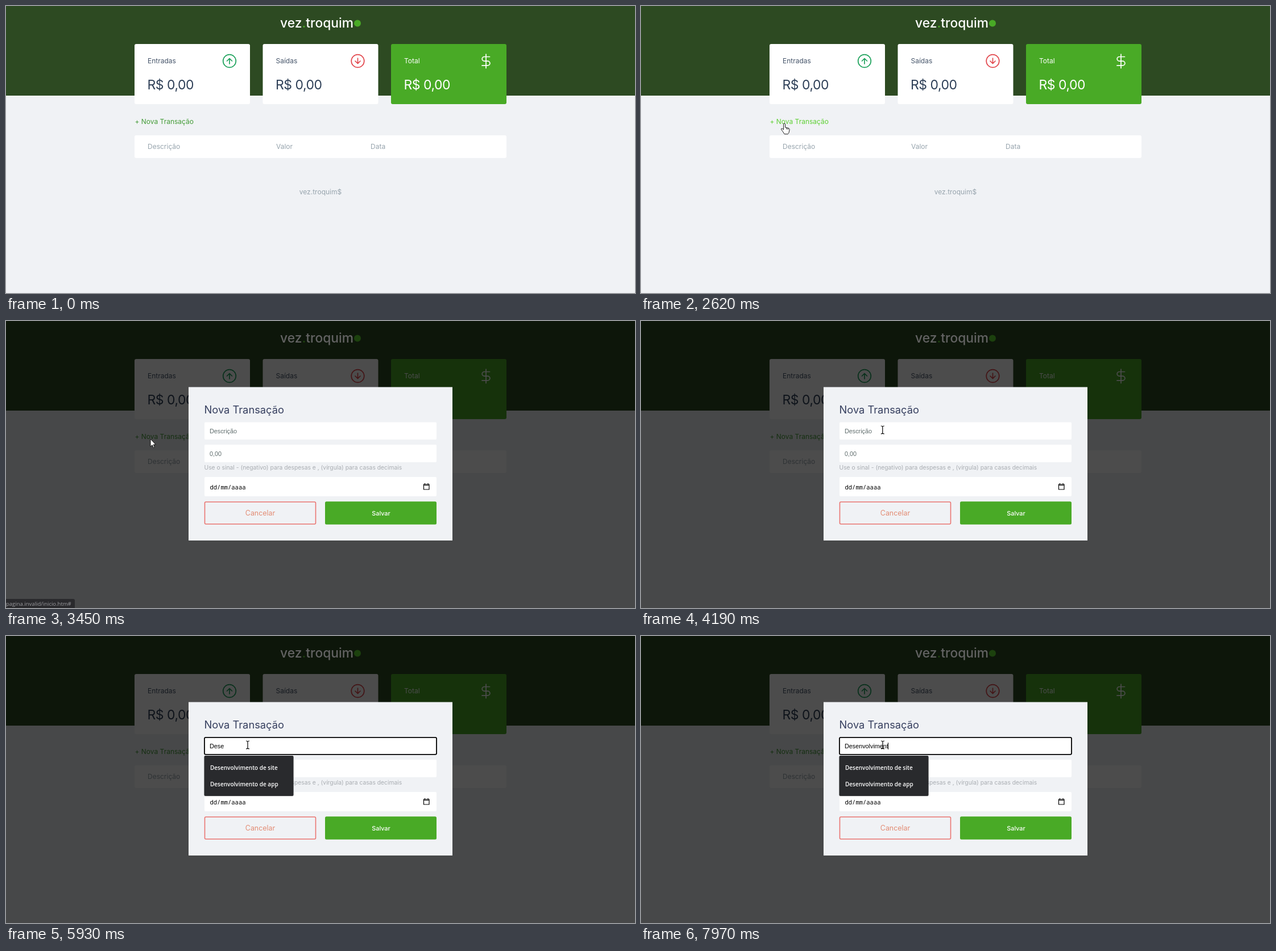
Recreate the animation shown at these times as an HTML page. Size 1106 by 506 pixels, loop 8000 ms.

```html
<!DOCTYPE html>
<html lang="pt-BR">
<head>
<meta charset="utf-8">
<title>Nova Transação</title>
<style>
  html, body { margin: 0; width: 100%; height: 100%; overflow: hidden; background: #f0f2f5; }
  svg { display: block; width: 100vw; height: 100vh; }
  text { font: 400 12px Inter, "Open Sans", sans-serif; white-space: pre; }
  .logo { font-size: 22.8px; font-weight: 500; fill: #fff; }
  .label { fill: #46556a; }
  .value { font-size: 23px; letter-spacing: -.5px; fill: #2f4058; }
  .total text { fill: #fff; }
  .muted { fill: #97a4ad; }
  .mid { text-anchor: middle; }
  .title { font-size: 18.3px; fill: #363f5f; }
  .hint { font-size: 10.3px; fill: #a9adb2; }
  .field { font: 10.8px "Liberation Sans", Arial, sans-serif; fill: #000; }
  .empty { fill: #5f6c6c; }
  .date { font: 10.5px "Noto Sans Mono", monospace; fill: #000; }
  .item { font: 600 10px "Open Sans", sans-serif; fill: #fff; }
  .url { font: 9.5px "Open Sans", sans-serif; fill: #9c9ca0; }
  .cancel { font-size: 12.4px; fill: #e38c74; }
  .save { font-size: 10.8px; font-weight: 500; fill: #fff; }
  .line { fill: none; stroke-linecap: round; stroke-linejoin: round; stroke-width: 1.7; }
</style>
</head>
<body>
<svg viewBox="0 0 1106 506" preserveAspectRatio="none">
  <rect width="1106" height="506" fill="#f0f2f5"/>
  <rect width="1106" height="158" fill="#2d4a22"/>
  <g id="logo">
    <text class="logo" x="482" y="37.5">vez<tspan fill="#49aa26">.</tspan>troquim</text>
    <circle cx="618" cy="30.5" r="6" fill="#49aa26"/>
  </g>
  <g id="cards"></g>

  <text id="link" x="226.5" y="208">+ Nova Transação</text>
  <rect x="226" y="228" width="654" height="40" rx="3" fill="#fff"/>
  <g class="muted">
    <text x="249" y="251.5">Descrição</text>
    <text x="475" y="251.5">Valor</text>
    <text x="641" y="251.5">Data</text>
    <text class="mid" x="553" y="331.5">vez.troquim$</text>
  </g>

  <g id="modal">
    <rect width="1106" height="506" opacity=".7"/>
    <use href="#logo" opacity=".12"/>
    <rect x="321" y="116.5" width="464" height="270.5" fill="#f0f2f5"/>
    <text class="title" x="348.5" y="163">Nova Transação</text>
    <g fill="#fff">
      <rect x="349" y="178.5" width="408" height="30.5" rx="2"/>
      <rect x="349" y="218" width="408" height="31" rx="2"/>
      <rect x="349" y="275" width="408" height="34" rx="2"/>
    </g>
    <text id="holder" class="field empty" x="358" y="197.5">Descrição</text>
    <text class="field empty" x="358" y="237.5">0,00</text>
    <text class="hint" x="348.5" y="261.5">Use o sinal - (negativo) para despesas e , (vírgula) para casas decimais</text>
    <text class="date" x="358.5" y="296.5">dd/mm/aaaa</text>
    <path d="M734.5 288h9.5v9h-9.5zM734.5 289.5h9.5M736.5 286v2M742 286v2" fill="none" stroke="#000" stroke-width="1.2"/>
    <rect x="349.5" y="319" width="195" height="39" rx="2" fill="none" stroke="#ea7470" stroke-width="1.6"/>
    <text class="mid cancel" x="447" y="343">Cancelar</text>
    <rect x="561" y="318.2" width="196" height="40.6" rx="2.5" fill="#49aa26"/>
    <text class="mid save" x="659.5" y="342.8">Salvar</text>

    <g id="focus">
      <rect x="349" y="178.8" width="408" height="30" rx="2" fill="none" stroke="#000" stroke-width="1.8"/>
      <text id="typed" class="field" x="358" y="197.5"></text>
      <rect id="caret" y="188" width="1" height="12"/>
      <rect id="shade" x="348" y="212" width="158" rx="3" opacity=".15"/>
      <rect id="list" x="348.5" y="211" width="157" rx="2" fill="#292a2d"/>
      <g id="items"></g>
    </g>
  </g>

  <g id="status">
    <path d="M0 490H118q3 0 3 3V506H0Z" fill="#2a2a2d"/>
    <text class="url" x="0" y="502">pagina.invalid/inicio.htm#</text>
  </g>

  <circle id="click" r="10" fill="#ff0" opacity=".47"/>
  <g id="pointer" stroke="#000" stroke-width=".9" fill="#fff" stroke-linejoin="round">
    <path id="arrow" d="M0 0V13.5L3.2 10.6L5.2 15.4L7.2 14.5L5.2 9.9H9.3Z"/>
    <path id="hand" d="M-1.5 1.5a1.5 1.5 0 0 1 3 0V7l5.5 1.2q2 .5 2 2.5l-1 5q-.4 2-2 3h-6q-1-1.5-2.5-4l-3-4q-.6-2 1.5-1.8l2.5 2zM3.8 7.8v2.7M6.3 8.3v2.5"/>
    <path id="beam" fill="none" stroke-width="1.2" d="M-3-7Q-.5-7 0-5.800Q.5-7 3-7M0-5.800V5.800M-3 7Q-.5 7 0 5.800Q.5 7 3 7"/>
  </g>
</svg>
<script>
  const LOOP = 8000, STEP = 67, BLINK = 530, ROW = 29.5;
  const HOVER_END = 3380, OPEN = 3450, FOCUS = 4390;
  const $ = id => document.getElementById(id);
  const show = (id, on) => { $(id).style.display = on ? '' : 'none'; };
  const within = (t, from, to) => t >= from && t < to;
  const clamp = v => Math.min(1, Math.max(0, v));
  const ease = p => p * p * (3 - 2 * p);

  const ring = '<circle cx="167" cy="30" r="11.3"/>';
  const cards = [
    ['Entradas', '#1fa35d', ring + '<path d="M167 35V25.500M162.500 30L167 25.500L171.500 30"/>'],
    ['Saídas', '#e2484e', ring + '<path d="M167 25V34.500M162.500 30L167 34.500L171.500 30"/>'],
    ['Total', '#fff', '<path d="M167 18V42.500M173.500 22.500h-9.500a3.800 3.800 0 0 0 0 7.600h6a3.900 3.900 0 0 1 0 7.800h-10"/>']
  ];
  $('cards').innerHTML = cards.map(([name, color, icon], i) => `
    <g class="${name.toLowerCase()}" transform="translate(${226 + 225.5 * i} 67)">
      <rect width="203" height="106" rx="3" fill="${i < 2 ? '#fff' : '#49aa26'}"/>
      <text class="label" x="23" y="34">${name}</text>
      <text class="value" x="22.5" y="79.5">R$ 0,00</text>
      <g class="line" stroke="${color}">${icon}</g>
    </g>`).join('');

  // pointer glides: start, duration, end point
  const home = { x: 1077, y: 486 };
  const glides = [
    { start: 530, time: 140, x: 1097, y: 498 },
    { start: 1200, time: 270, x: 635, y: 371 },
    { start: 1730, time: 130, x: 198, y: 310 },
    { start: 2130, time: 400, x: 252, y: 207 },
    { start: 2620, time: 290, x: 254, y: 208 },
    { start: 3710, time: 480, x: 425, y: 192 }
  ];

  function pointerAt(t) {
    let { x, y } = home;
    for (const g of glides) {
      if (t < g.start) break;
      const gone = Math.floor((t - g.start) / STEP + 1) * STEP;
      const p = ease(clamp(gone / (g.time + STEP)));
      x += (g.x - x) * p;
      y += (g.y - y) * p;
    }
    return { x, y };
  }

  // typing comes in bursts of evenly spaced letters
  const word = 'Desenvolviment';
  const bursts = [
    { start: 4860, gap: 180, count: 4 },
    { start: 6000, gap: 0, count: 1 },
    { start: 6450, gap: 190, count: 9 }
  ];
  const keys = bursts.flatMap(b => Array.from({ length: b.count }, (_, i) => b.start + i * b.gap));
  const entries = ['Desenvolvimento de site', 'descrição', 'Desenvolvimento de app',
    'Aluguel', 'Internet', 'Conta de luz'];

  function setText(text) {
    const hits = entries.filter(e => e.toLowerCase().startsWith(text.toLowerCase()));
    const height = 12 + ROW * hits.length;
    $('typed').textContent = text;
    $('list').setAttribute('height', height);
    $('shade').setAttribute('height', height);
    $('items').innerHTML = hits.map((e, i) =>
      `<text class="item" x="359" y="${235.7 + ROW * i}">${e}</text>`).join('');
    const end = text ? $('typed').getComputedTextLength() : 0;
    $('caret').setAttribute('x', Math.round(357.6 + end));
  }

  function drawPointer(t) {
    const { x, y } = pointerAt(t);
    const hover = y < 216 && t < OPEN;
    const shape = hover && t < HOVER_END ? 'hand' : x > 349 && within(y, 179, 209) ? 'beam' : 'arrow';
    show('pointer', t >= glides[0].start);
    $('pointer').setAttribute('transform', `translate(${x} ${y})`);
    for (const id of ['arrow', 'hand', 'beam']) show(id, id === shape);
    $('link').setAttribute('fill', hover ? '#5fd035' : '#449c38');

    const onLink = within(t, 3190, HOVER_END);
    show('click', onLink || within(t, FOCUS, 4600));
    $('click').setAttribute('cx', onLink ? 254 : 423);
    $('click').setAttribute('cy', onLink ? 208 : 191);
  }

  function drawForm(t) {
    const done = keys.filter(k => k <= t);
    show('modal', t >= OPEN);
    show('focus', t >= FOCUS);
    show('holder', !done.length);
    if (t < FOCUS) return;
    setText(word.slice(0, done.length));
    const last = done.length ? done[done.length - 1] : FOCUS;
    show('caret', (t - last) % (2 * BLINK) < BLINK);
  }

  function tick() {
    const t = performance.now() % LOOP;
    drawPointer(t);
    drawForm(t);
    $('status').setAttribute('opacity', t < 3780 ? clamp((t - 2850) / 190) : 0);
    requestAnimationFrame(tick);
  }
  tick();
</script>
</body>
</html>
```
